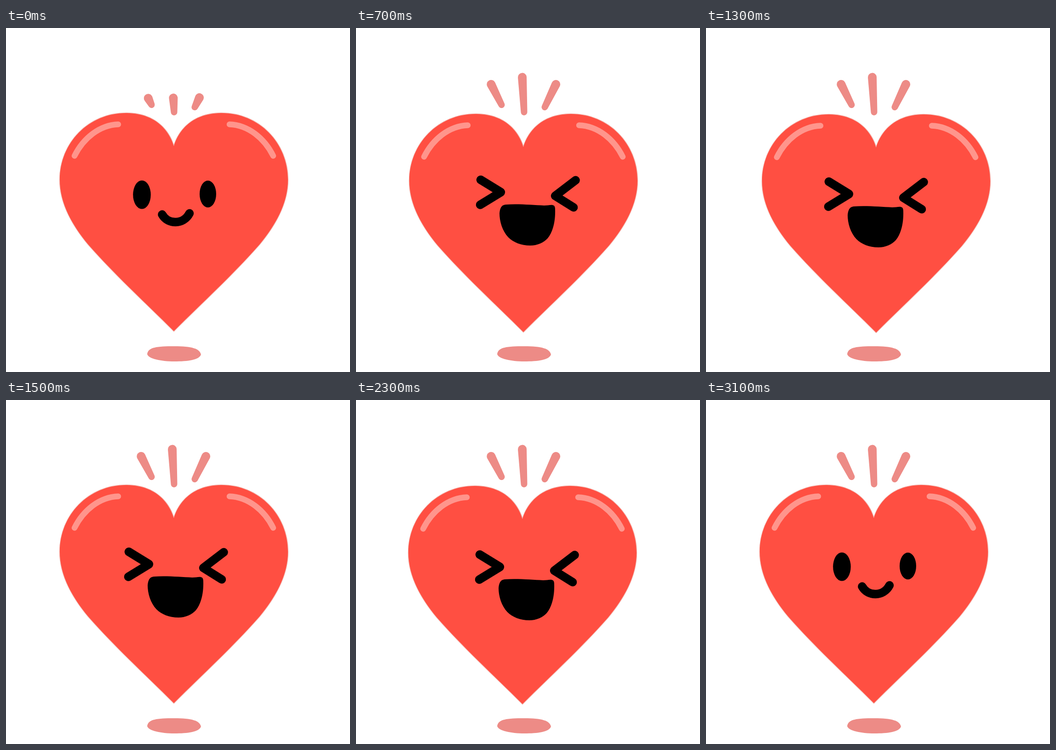
These frames come from a looping animation (748 px wide and 748 px high, 3200 ms). An HTML page with a canvas:

```html
<!DOCTYPE html>
<html lang="en">
<head>
<meta charset="utf-8">
<title>Laughing heart</title>
<style>
  html, body { margin: 0; width: 100%; height: 100%; overflow: hidden; background: #fff; }
  canvas { display: block; width: 100%; height: 100%; }
</style>
</head>
<body>
<canvas width="748" height="748"></canvas>
<script>
const ctx = document.querySelector('canvas').getContext('2d');
const RED = '#ff4f42', EDGE = '#f3b5ae', SHINE = '#ff958c', PINK = '#ed8b86', BLACK = '#000';
const STEP = 100, STEPS = 32, LAUGH_START = 6, LAUGH_END = 30, CYCLE = 12;
const CENTER = 365;

// The right half plus its reflection about the vertical axis
function mirrored(d) {
  const half = new Path2D(d), whole = new Path2D(half);
  whole.addPath(half, new DOMMatrix([-1, 0, 0, 1, 2 * CENTER, 0]));
  return whole;
}

const heart = mirrored('M365 257C374 227 401 186 467 185C550 184 613 250 613 330C613 382 585 430 551 471C490 540 430 594 365 659Z');
const shine = mirrored('M486 209.5C527 211 562 240 581 278');
const shadow = new Path2D('M307 709C309 694 328 692 366 692S421 697 424 710C420 722 395 725 366 725S309 719 307 709Z');
const smile = new Path2D('M339.5 405.5C352 428 386 428 399 403');
const squint = new Path2D('M267 330L311 357L266 384.5M473.5 331L429 365L469 390');
const openMouth = new Path2D('M321 384C350 382 380 385 405 386C418 386 429 380 429 394C430 425 422 446 413 457C404 467 390 473 375 473C355 473 338 466 327 455C314 441 308 420 308 403C309 392 312 385 321 384Z');

const rays = [
  { x: 316.5, y: 167, tilt: -27, length: 16, growth: 34 },
  { x: 365.5, y: 183, tilt: -3, length: 31, growth: 45 },
  { x: 410.5, y: 172, tilt: 26, length: 23, growth: 32 }
];

function stroke(path, color, width) {
  ctx.strokeStyle = color;
  ctx.lineWidth = width;
  ctx.stroke(path);
}

function fill(path, color) {
  ctx.fillStyle = color;
  ctx.fill(path);
}

function oval(x, y, rx, ry) {
  const path = new Path2D();
  path.ellipse(x, y, rx, ry, 0, 0, 2 * Math.PI);
  fill(path, BLACK);
}

// Tapered stroke that grows from its narrow foot
function drawRay({ x, y, tilt, length, growth }, stretch) {
  const foot = 7, tip = 9.5, reach = length + growth * stretch;
  const angle = (tilt - 90) * Math.PI / 180;
  const spread = Math.acos((foot - tip) / reach);
  const path = new Path2D();
  path.arc(x, y, foot, angle + spread, angle - spread + 2 * Math.PI);
  path.arc(x + reach * Math.cos(angle), y + reach * Math.sin(angle), tip, angle - spread, angle + spread);
  fill(path, PINK);
}

function drawHeart() {
  stroke(heart, EDGE, 2.5);
  fill(heart, RED);
  stroke(shine, SHINE, 12.5);
}

function drawSmile() {
  oval(295.5, 362.5, 19.3, 31);
  oval(439, 361, 18, 29.3);
  stroke(smile, BLACK, 18.5);
}

function drawLaugh() {
  stroke(squint, BLACK, 18.5);
  fill(openMouth, BLACK);
}

function moved(x, y, draw) {
  ctx.save();
  ctx.translate(Math.round(x), Math.round(y));
  draw();
  ctx.restore();
}

function render() {
  const step = Math.floor(performance.now() / STEP) % STEPS;
  const stretch = 1 - Math.cos(step * Math.PI / 2);

  ctx.fillStyle = '#fff';
  ctx.fillRect(0, 0, 748, 748);
  ctx.lineCap = ctx.lineJoin = 'round';
  fill(shadow, PINK);

  if (step >= LAUGH_START && step < LAUGH_END) {
    const beat = step - LAUGH_START;
    const swing = (middle, size, peak) =>
      middle + size * Math.cos((beat - peak) * 2 * Math.PI / CYCLE);
    const shake = Math.max(0, -Math.cos((beat - 0.5) * Math.PI / 2));
    moved(swing(-1.3, 1.8, 10.4) + 9 * shake, swing(1.3, 1.3, 3) + 3.3 * shake, drawHeart);
    moved(swing(2, 2.3, 2), swing(2, 4, 5), drawLaugh);
  } else {
    drawHeart();
    drawSmile();
  }
  rays.forEach(ray => drawRay(ray, stretch));

  requestAnimationFrame(render);
}
render();
</script>
</body>
</html>
```
